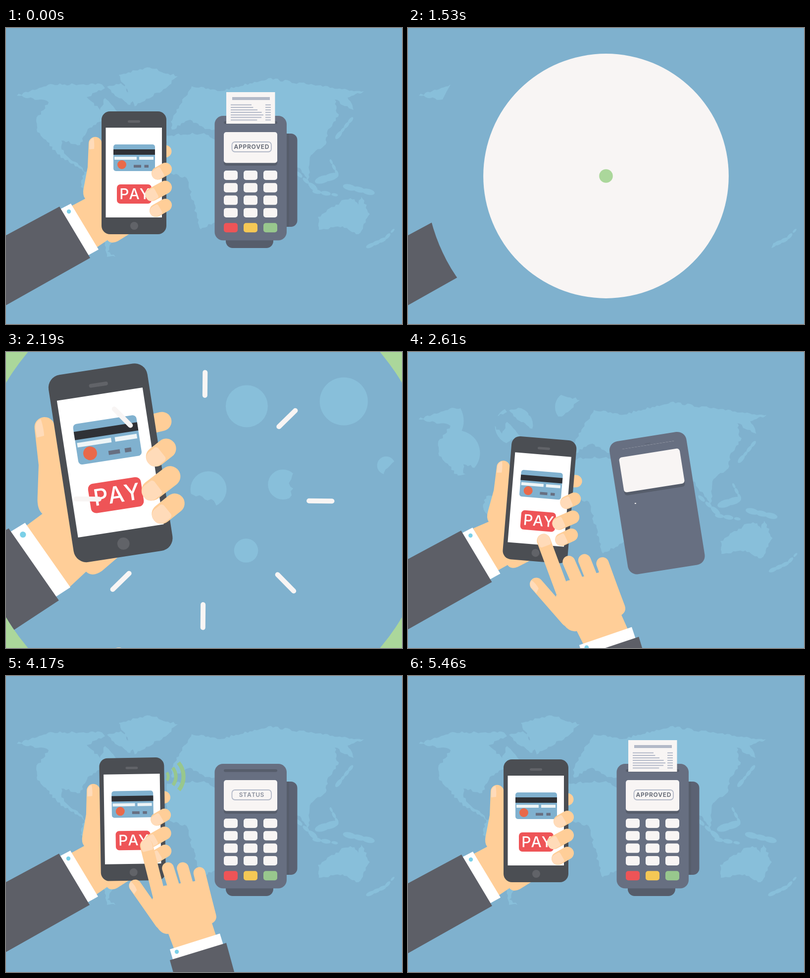
These frames come from a looping animation (800 px wide and 600 px high, 5490 ms). An HTML page with a canvas:

```html
<!DOCTYPE html>
<html lang="en">
<head>
<meta charset="utf-8">
<title>Mobile payment</title>
<style>
html, body { margin: 0; width: 100%; height: 100%; overflow: hidden; background: #7fb1ce; }
canvas { display: block; }
</style>
</head>
<body>
<canvas id="stage" width="800" height="600"></canvas>
<script>
const ctx = document.getElementById('stage').getContext('2d');
const LOOP = 5490, STEP = 30, REVEAL = 1797;
const RAD = Math.PI / 180;
const C = {
  bg: '#7fb1ce', map: '#88bfda', skin: '#ffce98', nail: '#ffdbb9', sleeve: '#5d5f67',
  phone: '#4b4e53', detail: '#616368', body: '#676f81', side: '#5b6273', dark: '#565d6b',
  paper: '#f8f5f4', line: '#b3b9c8', red: '#ee5457', yellow: '#f5c855', green: '#98c78d',
  mint: '#abd79b', dot: '#7bd0e8', card: '#80b1cf', stripe: '#2f3136', label: '#eef5f7'
};

// ---------- easing ----------
const span = (t, start, dur) => Math.max(0, Math.min(1, (t - start) / dur));
const swell = (t, start, dur) => (1 - Math.cos(Math.PI * span(t, start, dur))) / 2;
const remain = (t, start, dur, power) => Math.pow(1 - span(t, start, dur), power);
// Damped swing that peaks with size 1 at time `peak`
const swing = (t, peak, decay, half) =>
  Math.exp((peak - t) / decay) * Math.cos(Math.PI * (t - peak) / half);
function pop(t, start, dur = 500, c = 2.2) {
  const p = span(t, start, dur), q = p - 1;
  return p && 1 + (c + 1) * q * q * q + c * q * q;
}

// ---------- drawing helpers ----------
function group(draw) { ctx.save(); draw(); ctx.restore(); }
function pose(px, py, dx, dy, scale, deg) {
  ctx.translate(px + dx, py + dy);
  ctx.rotate(deg * RAD);
  ctx.scale(scale, scale);
  ctx.translate(-px, -py);
}
function box(x, y, x2, y2, r, fill) {
  ctx.beginPath();
  ctx.roundRect(x, y, x2 - x, y2 - y, r);
  ctx.fillStyle = fill;
  ctx.fill();
}
function disc(x, y, r, fill) {
  ctx.beginPath();
  ctx.arc(x, y, r, 0, 7);
  ctx.fillStyle = fill;
  ctx.fill();
}
function shape(d, fill) { ctx.fillStyle = fill; ctx.fill(new Path2D(d)); }
function stroke(x, y, x2, y2, w, color) {
  ctx.beginPath();
  ctx.moveTo(x, y);
  ctx.lineTo(x2, y2);
  ctx.lineWidth = w;
  ctx.lineCap = 'round';
  ctx.strokeStyle = color;
  ctx.stroke();
}
function scaled(x, y, s, draw) {
  if (s > 0) group(() => { pose(x, y, 0, 0, s, 0); draw(); });
}

// ---------- world map ----------
let seed = 7;
const rand = () => (seed = seed * 16807 % 2147483647) / 2147483647;

// Closed outline through a few points, with seeded ragged edges
function coast(text) {
  const pts = text.split(' ').map(p => p.split(',').map(Number));
  const path = new Path2D();
  pts.forEach(([x, y], i) => {
    const [x2, y2] = pts[(i + 1) % pts.length];
    const len = Math.hypot(x2 - x, y2 - y), n = Math.ceil(len / 5);
    for (let k = 0; k < n; k++) {
      const f = k / n, off = k ? (rand() - .5) * Math.min(5, len / 3) / len : 0;
      path.lineTo(x + (x2 - x) * f - (y2 - y) * off, y + (y2 - y) * f + (x2 - x) * off);
    }
  });
  path.closePath();
  return path;
}
function islands(x, y, x2, y2, n, size) {
  const path = new Path2D(), tilt = Math.atan2(y2 - y, x2 - x);
  for (let i = 0; i < n; i++) {
    const f = n > 1 ? i / (n - 1) : 0, r = size * (.7 + .6 * rand());
    const cx = x + (x2 - x) * f, cy = y + (y2 - y) * f;
    path.moveTo(cx + r * Math.cos(tilt), cy + r * Math.sin(tilt));
    path.ellipse(cx, cy, r, r * .45, tilt, 0, 7);
  }
  return path;
}
const west = [
  coast('22,137 85,115 190,113 200,122 163,140 190,166 200,142 226,170 165,205 150,237 112,228 112,246 160,292 104,256 62,206 61,186 86,150'),
  coast('204,119 232,112 258,140 251,156 225,140'),
  coast('228,95 290,80 347,98 318,124 271,152 260,159'),
  coast('158,292 215,300 265,335 235,400 205,453 221,464 204,464 185,370 151,322')
];
const east = [
  coast('350,158 375,118 432,128 530,102 640,119 723,128 690,141 702,166 664,145 671,180 651,205 646,236 616,258 611,312 577,262 549,309 520,262 481,258 470,290 430,206 402,205 372,186 335,206 333,190'),
  coast('325,218 400,213 446,242 481,286 435,385 393,408 365,304 322,290'),
  coast('630,383 683,348 704,347 712,358 718,342 735,377 712,418 680,402 632,409'),
  islands(592, 297, 620, 322, 3, 9), islands(628, 332, 664, 338, 3, 8),
  islands(640, 307, 656, 302, 2, 13), islands(694, 323, 732, 332, 3, 12),
  islands(672, 217, 696, 187, 4, 8), islands(736, 441, 760, 430, 3, 8),
  islands(771, 422, 781, 411, 2, 7), islands(657, 271, 668, 293, 3, 6)
];
const westSpots = [[60, 140], [100, 205], [214, 150], [328, 112], [175, 310]];
const eastSpots = [[555, 158], [413, 165], [357, 287], [466, 280], [412, 377], [617, 252], [690, 385]];

// Land shows through circles that open one after another
function land(shapes, spots, start, gap, t) {
  group(() => {
    ctx.beginPath();
    spots.forEach(([x, y], i) => {
      const r = Math.max(0, t - start - i * gap) * .4;
      ctx.moveTo(x + r, y);
      ctx.arc(x, y, r, 0, 7);
    });
    ctx.clip();
    ctx.fillStyle = C.map;
    shapes.forEach(s => ctx.fill(s));
  });
}
function worldMap(t) {
  group(() => {
    pose(220, 310, 0, 0, 1 + 1.15 * remain(t, 1850, 800, 2), 0);
    land(west, westSpots, 2478, 18, t);
    land(east, eastSpots, 2102, 11, t);
  });
}

// ---------- terminal ----------
function word(text, start, t, color, gap) {
  ctx.font = '600 12px Inter, sans-serif';
  ctx.fillStyle = color;
  const widths = [...text].map(c => ctx.measureText(c).width + gap);
  let x = 496 - (widths.reduce((a, b) => a + b) - gap) / 2;
  const base = ctx.globalAlpha;
  widths.forEach((w, i) => {
    ctx.globalAlpha = base * span(t, start + i * 50, 150);
    ctx.fillText(text[i], x, 245);
    x += w;
  });
  ctx.globalAlpha = base;
}
function receipt(t) {
  group(() => {
    ctx.beginPath();
    ctx.rect(430, 0, 130, 194);
    ctx.clip();
    ctx.translate(0, 64 * (1 - pop(t, 4440, 700)));
    box(445, 130, 543.5, 230, 0, C.paper);
    box(457, 140, 533, 146, 0, C.line);
    for (let i = 0; i < 7; i++) {
      const y = 154.8 + i * 5.1;
      box(454, y, 508 + 12 * Math.sin(i * .8 - 1.6), y + 2, 0, C.line);
      box(524, y, 535, y + 2, 0, C.line);
    }
  });
}
function keypad(t) {
  const last = [C.red, C.yellow, C.green];
  for (let i = 0; i < 15; i++) {
    const col = i % 3, row = Math.floor(i / 3);
    const x = 454 + col * 40, y = 298.5 + row * 25.3 + (row === 4 ? 5 : 0);
    scaled(x, y, pop(t, 2600 + i * 62), () =>
      box(x - 14, y - 9.5, x + 14, y + 9.5, 5, row === 4 ? last[col] : C.paper));
  }
}
function screen(t) {
  scaled(494, 243, pop(t, 2430), () => {
    box(440, 215, 548, 279, 5, C.dark);
    box(440, 211, 548, 273.5, 5, C.paper);
  });
  group(() => {
    ctx.globalAlpha = span(t, 2850, 200);
    ctx.beginPath();
    ctx.roundRect(456.5, 231, 79.5, 20, 6);
    ctx.lineWidth = 1.8;
    ctx.strokeStyle = C.line;
    ctx.stroke();
    ctx.globalAlpha = 1 - span(t, 4400, 120);
    word('STATUS', 3000, t, '#8a909d', .3);
    ctx.globalAlpha = 1;
    word('APPROVED', 4480, t, '#5a606d', .7);
  });
}
function terminal(t) {
  const size = pop(t, 2260, 500, 1.7);
  if (!size) return;
  const still = 1 - swell(t, 2610, 250);
  group(() => {
    pose(494, 304, 9 * still, 2 * still, size, -9 * swing(t, 2610, 150, 400));
    const out = pop(t, 2780);
    if (out) {
      const x = 30 * (out - 1), y = 20 * (out - 1);
      box(540 + x, 214, 588.5 + x, 403, 13, C.side);
      box(560 + x, 214, 572 + x, 403, 0, C.dark);
      box(444, 410 + y, 540, 446 + y, 14, C.dark);
    }
    box(421.5, 178, 567, 430.5, 17, C.body);
    scaled(494, 191, pop(t, 2600), () => box(440, 189, 548, 194.5, 3, C.dark));
    screen(t);
    keypad(t);
    receipt(t);
  });
}

// ---------- hand with phone ----------
function phone() {
  box(193, 169, 324, 418, 17, C.phone);
  box(246, 187, 271, 192, 2.5, C.detail);
  disc(259, 401, 8, C.detail);
  box(201.5, 202, 315, 384, 0, '#fff');
  box(217, 236, 301, 290, 5, C.card);
  box(217, 246, 301, 257, 0, C.stripe);
  box(219, 261, 264, 267, 0, C.label);
  box(269, 261, 298, 267, 0, C.label);
  disc(234, 277, 9, '#e9694a');
  box(258, 277.5, 273, 283, 0, C.body);
  box(279.5, 277.5, 288, 283, 0, C.body);
  box(224, 317, 294, 356, 7, C.red);
  group(() => {
    ctx.font = '500 30px Inter, sans-serif';
    ctx.fontKerning = 'none';
    ctx.textAlign = 'center';
    ctx.fillStyle = '#fff';
    ctx.fillText('PAY', 260, 346.5);
  });
}
function waves(t) {
  for (let i = 0; i < 3; i++) {
    const s = pop(t, 3560 + i * 130, 400, 1.7) * (1 - span(t, 4360 + i * 60, 180));
    if (s <= 0) continue;
    ctx.beginPath();
    ctx.arc(319, 208, 13 + 15.5 * i, -.67 * s, .67 * s);
    ctx.lineWidth = (6 + i) * s;
    ctx.lineCap = 'butt';
    ctx.strokeStyle = C.green;
    ctx.stroke();
  }
}
function finger(x, y, x2, y2, w) {
  stroke(x, y, x2, y2, w, C.skin);
  group(() => {
    ctx.translate(x, y);
    ctx.rotate(Math.atan2(y2 - y, x2 - x));
    box(-w / 2, -w * .4, w * .36, w * .44, [10, 4, 4, 10], C.nail);
  });
}
function holdingHand(t) {
  const enter = remain(t, 1850, 800, 2);
  const lean = swell(t, 2900, 300) - swell(t, 4600, 500);
  const sway = 4.7 * swing(t, 2610, 333, 620);
  const dx = -185 * enter - lean, dy = 40 * enter - 2 * lean, rot = sway - .9 * lean;
  group(() => {
    pose(185, 417, dx - sway / 2, dy, 1 + 1.64 * enter, rot);
    shape('M130 362L160 346Q154 339 157 324L165 282L167 234A13 13 0 0 1 193.5 234V398H262L250 417L226 432Q212 439 205 430L180 447Z', C.skin);
    shape('M168 246V234Q169 224 177 222.5Q179 235 178 245Z', C.nail);
    const grip = Math.abs(rot) * 1.3;
    stroke(310, 252, 322 + grip, 250, 25, C.skin);
    waves(t);
    phone();
    ctx.translate(grip, 0);
    finger(307, 294.5, 322, 286, 26);
    finger(295, 337.5, 321.5, 323, 27);
    finger(303, 370, 322, 359, 26);
  });
  group(() => {
    pose(185, 417, dx, dy, 1 + 1.42 * enter, -12 * enter);
    shape('M106 369L131 356L187 449L162 463Z', '#fff');
    shape('M-200 528L108 362L170 466L-200 675Z', C.sleeve);
    disc(127, 372, 4.2, C.dot);
  });
}

// ---------- tapping hand ----------
function tappingHand(t) {
  const leave = swell(t, 4600, 600);
  if (leave === 1) return;
  const reach = remain(t, 1850, 1390, 4), lift = 1 - swell(t, 2550, 650);
  const back = swell(t, 3300, 350);
  const dx = 25 * lift + 7 * back + 30 * leave;
  const dy = 1085 * reach + 8 * back + 330 * leave;
  const size = 1 + 1.4 * reach;
  group(() => {
    pose(375, 530, dx, dy, size, -9.3 * lift - 3 * back - 6 * leave);
    shape('M294 438L318 414L380 408L404 400L420 478Q422 490 411 495L419 525L334 550L322 512Q308 512 300 497L284 470Z', C.skin);
    stroke(328, 379, 341, 430, 24, C.skin);
    stroke(358, 380.5, 369, 430, 24, C.skin);
    stroke(391, 392, 408, 482, 24, C.skin);
    stroke(260, 411, 308, 488, 25, C.skin);
    stroke(287, 331, 307, 432, 26, C.skin);
    shape('M249 416Q246 407 252 402Q260 410 263 420L257 428Z', C.nail);
    ctx.translate(287, 331);
    ctx.rotate(-11 * RAD);
    box(-11, -12.5, 12, 11, [10, 10, 4, 4], C.nail);
  });
  group(() => {
    pose(375, 530, dx, dy, size, -1.5 * lift);
    shape('M324 546L425 514L432 537L331 570Z', '#fff');
    shape('M324 568L438 533L500 760L378 762Z', C.sleeve);
    disc(338, 551, 4.2, C.dot);
  });
}

// ---------- burst, scene, loop ----------
function burst(t) {
  const p = span(t, 1900, 500);
  if (p <= 0 || p >= 1) return;
  const far = 314 * (1 - (1 - p) * (1 - p)), near = 314 * Math.pow(p, .72);
  for (let i = 0; i < 8; i++) {
    const a = (i * 45 + .5) * RAD, x = Math.cos(a), y = Math.sin(a);
    stroke(400 + x * near, 300 + y * near, 400 + x * far, 300 + y * far, 10, C.paper);
  }
}
function scene(t) {
  ctx.fillStyle = C.bg;
  ctx.fillRect(0, 0, 800, 600);
  worldMap(t);
  terminal(t);
  holdingHand(t);
  tappingHand(t);
  burst(t);
}
const radius = (t, start) => 522 * swell(t, start, 500);

function render(t) {
  if (t < REVEAL) scene(t + LOOP);
  disc(400, 300, radius(t, 1215), C.bg);
  disc(400, 300, radius(t, 1288), C.paper);
  disc(400, 300, radius(t, 1478), C.mint);
  if (t < REVEAL) return;
  group(() => {
    ctx.beginPath();
    ctx.arc(400, 300, radius(t, REVEAL), 0, 7);
    ctx.clip();
    scene(t);
  });
}
function tick() {
  const t = performance.now() % LOOP;
  render(Math.floor(t / STEP) * STEP);
  requestAnimationFrame(tick);
}
tick();
</script>
</body>
</html>
```
